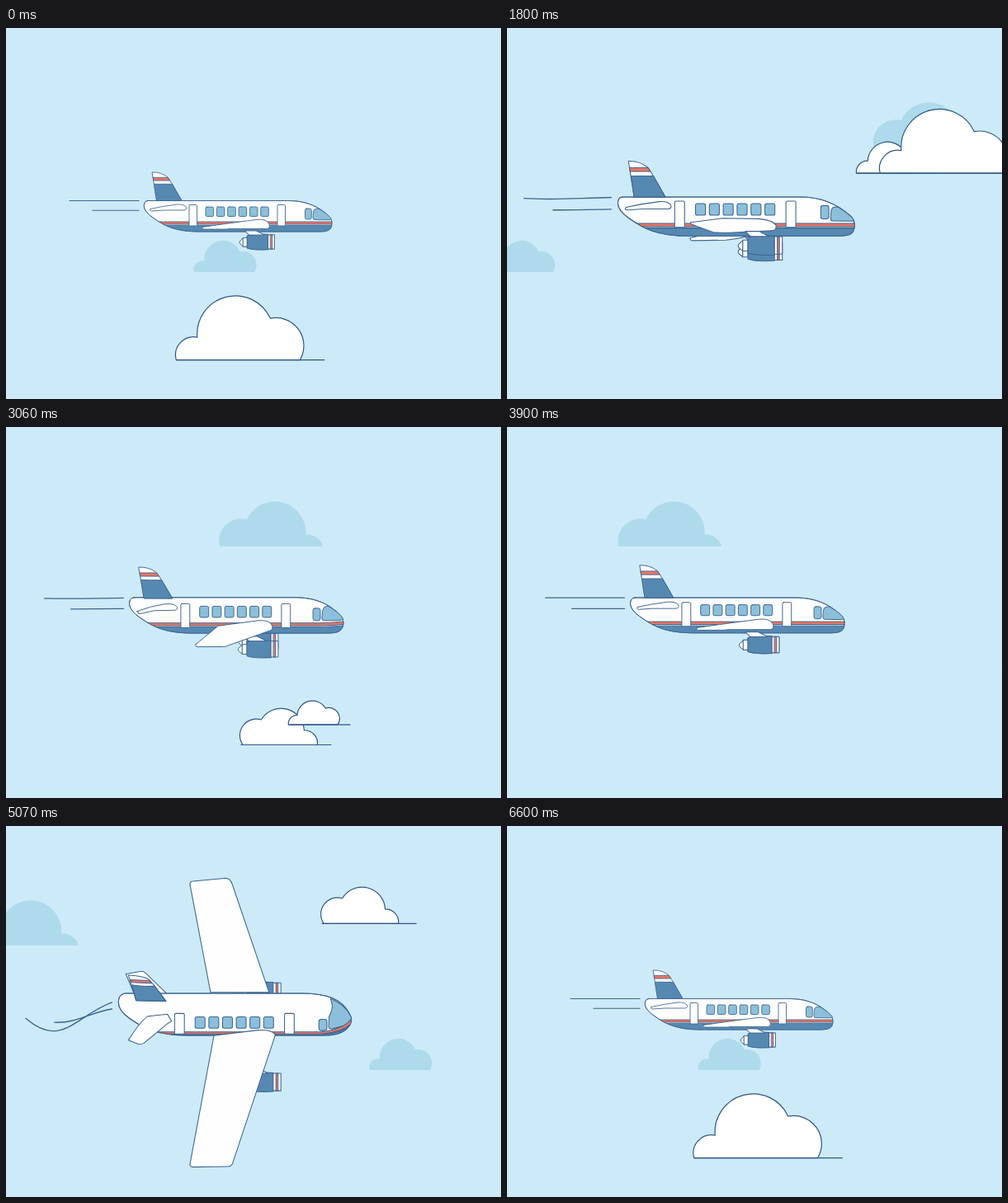
Animation, 600 px wide and 450 px high, one loop 6630 ms. Source, as an HTML page:

```html
<!DOCTYPE html>
<html lang="en">
<head>
<meta charset="utf-8">
<title>Plane in flight</title>
<style>
  html, body { margin: 0; width: 100%; height: 100%; overflow: hidden; background: #cdeaf8; }
  svg { display: block; width: 100vw; height: 100vh; }
  .pale { fill: #aedbeb; }
  .white { fill: #fff; stroke: #2d5788; stroke-width: 1.2; stroke-linejoin: round; }
  .white path { vector-effect: non-scaling-stroke; }
  #plane { stroke: #3d6591; stroke-width: .85; stroke-linejoin: round; stroke-linecap: round; }
</style>
</head>
<body>
<svg viewBox="0 0 600 450">
  <rect width="600" height="450" fill="#cdeaf8"/>
  <g id="clouds"></g>
  <g id="plane"></g>
</svg>
<script>
const LOOP = 6630;
const WHITE = '#fefefe', BLUE = '#5689b2', RED = '#ee7560', GLASS = '#8cbfd9';
const cloudLayer = document.getElementById('clouds');
const plane = document.getElementById('plane');

// Outlines start at the lower left, on the base line.
const SHAPES = {
  broad: 'M1 0A22 22 0 0 1 26.5 -27.5A46.4 46.4 0 0 1 115 -50.5A34 34 0 0 1 151 0Z',
  round: 'M3.6 0A20 20 0 0 1 26 -30.5A28 28 0 0 1 78 -17.5A15.5 15.5 0 0 1 94 0Z',
  low: 'M0 0A27 27 0 0 1 33 -32.5A37.5 37.5 0 0 1 104.5 -14.5A20 20 0 0 1 125 0Z'
};

// x is the left edge at time "at"; speed in px per ms; base is the length of the ground line.
const clouds = [
  { shape: 'broad', scale: .49, x: 227.5, y: 296, at: 0, speed: .1363 },
  { shape: 'low', scale: 1, x: 259, y: 144.7, at: 3060, speed: .1473 },
  { shape: 'low', scale: .496, x: 279, y: 63, at: 930, speed: .51, base: 74 },
  { shape: 'round', scale: .86, flip: 81, x: 424, y: 176.2, at: 1800, speed: .66, base: 97 },
  { shape: 'broad', scale: 1, x: 452, y: 176.2, at: 1800, speed: .68, base: 181 },
  { shape: 'round', scale: 1, x: 284, y: 385.5, at: 3060, speed: .59, base: 111 },
  { shape: 'round', scale: .66, flip: 62, x: 343, y: 361.2, at: 3060, speed: .565, base: 75 },
  { shape: 'round', scale: 1, x: 382, y: 118.3, at: 5070, speed: .387, base: 116 },
  { shape: 'broad', scale: 1, x: 206, y: 402.6, at: 0, speed: .68, base: 181 }
];

cloudLayer.innerHTML = clouds.map(c => {
  const turn = c.flip ? `translate(${c.flip} 0) scale(${-c.scale} ${c.scale})` : `scale(${c.scale})`;
  const line = c.base ? `<path d="M1 0H${c.base}"/>` : '';
  return `<g class="${c.base ? 'white' : 'pale'}"><path d="${SHAPES[c.shape]}" transform="${turn}"/>${line}</g>`;
}).join('');

// Keys are [time, value] pairs joined by a sine ease.
const SIZE = [[0, 1], [780, 1], [1800, 1.26], [3060, 1.14], [4150, 1.14], [4800, 1.26], [4880, 1.26], [6100, 1], [LOOP, 1]];
const ROLL = [[0, 0], [370, 0], [1520, .53], [1800, -.1], [3000, .137], [3700, 0], [4120, 0], [4780, 1.43], [5575, 0], [LOOP, 0]];
const WAVE = [[0, 0], [500, 0], [1000, .02], [1800, .06], [2600, .02], [3100, .03], [3800, 0], [4300, 0], [5050, 1], [5850, 0], [LOOP, 0]];

function track(keys, t) {
  const i = keys.findIndex(key => key[0] > t);
  const [t0, a] = keys[i - 1], [t1, b] = keys[i];
  return a + (b - a) * (1 - Math.cos(Math.PI * (t - t0) / (t1 - t0))) / 2;
}

function mix([a, b], k) {
  const target = b.match(/-?[\d.]+/g);
  let i = 0;
  return a.replace(/-?[\d.]+/g, n => (+n + (target[i++] - n) * k).toFixed(2));
}

const path = (d, fill, extra = '') => `<path d="${d}" fill="${fill}" ${extra}/>`;
const box = (x, y, w, h, fill, r = 0) =>
  `<rect x="${x}" y="${y}" width="${w}" height="${Math.max(h, 0)}" rx="${r}" fill="${fill}"/>`;

// Each part: level pose, banked pose and, for wings, the pose with the underside in view.
const BODY = [
  'M172 209.5L343 209.5C366 209.5 380 218 390 227C396 232 395.5 238 394 242C392 246 388 247 378 247L235 247C205 247 192 240 178 230C168 223 166 217 168 212Q169 209.5 172 209.5Z',
  'M175 207.7L345 207.7C372 207.7 385 214 392 227C396 234 394 238 390 242C385 247 378 248.7 365 248.7L235 248.7C205 248.7 192 242 178 232C168 225 166 218 168 212Q170 207.7 175 207.7Z'];
const STRIPE = [
  'M160 235L370 235Q385 235 400 235L400 238Q385 238 370 238L160 238Z',
  'M160 245.2L365 245.2Q385 243.5 396 231L399 233Q387 246 365 247.2L160 247.2Z'];
const BELLY = [
  'M160 239.4L370 239.4Q385 239.4 400 239.4L400 255L160 255Z',
  'M160 247.9L365 247.9Q387 246.6 399 234.5L400 255L160 255Z'];
const NEAR_WING = [
  'M238 241.5L262 238L303 232.5Q317 231 319 238Q320.5 243 316 243.4L270 243.5Q269 244 266 244L240 244Q237 244 238 241.5Z',
  'M237 373L260.3 248.7L303 243.5Q316 242.5 319.7 247.5Q320 249 318.5 253L278.5 372Q277.5 375.5 274 375.5L240 376Q236.5 376 237 373Z',
  'M237.5 234L268 230L300 230.5Q316 231 319.5 237Q320 242 315 242L275 243.8Q266 244 259 243.4L240 236.5Q236 235 237.5 234Z'];
const FAR_WING = [
  'M237.5 239L257 238L314 236L277 238Q275 238 271 238L240 238Q237 238 237.5 239Z',
  'M237 103L257 207L314 207L278 102Q276 96.5 271.5 96.5L240 99.5Q236.5 99.5 237 103Z',
  'M237 249L257 244L314 238L291 247.5Q284 249.5 271 251L240 251.5Q236.5 251.5 237 249Z'];
const NEAR_STAB = [
  'M175 219.5Q190 216 207 214Q217 213.5 218.5 218Q219 221 215 221L191 221L177 222Q173 222 175 219.5Z',
  'M177 253L190 233Q196 230 209 228.5Q215 228 218.5 233Q219 235 215 237L192 256Q190 257 187 257L177 257Q174 257 177 253Z'];
const FAR_STAB = [
  'M174 220L186 218Q189 218 191 218L215 216L183 216Z',
  'M174.5 189L187 186.8Q191 186 193 187.5L215.5 209L183 209Z'];
const FIN = [
  'M177.5 175Q188 174.5 196 181Q199 185 201.5 189.5L213 209.5L183 209.5Z',
  'M177 190Q190 190.5 196 193.5Q200 197 202.5 200.5L213.5 215.2L184.5 214.6Z'];
const FIN_BLUE = [
  'M180 189.3Q191 189.3 201.5 189.3L213 209.5L183 209.5Z',
  'M180.5 199.4Q191 201.5 202.5 200.5L213.5 215.2L184.5 214.6Z'];
const FIN_RED = ['M178.5 181.3L196.3 181.3L198.8 185L179.3 185Z', 'M178.6 194.4L197.4 195.2L199.6 197.8L179.8 197Z'];
const SHIELD = [
  'M379 219L374.5 219.5Q373 220.5 372.5 223L372 230Q372 232.5 374 232.5L390 232.8Q395 233 394.3 231.5Q392 227 379 219Z',
  'M374 213L375.5 219Q375.5 225 372.5 230L372 240Q372 242.3 375 242.3L386 239.5Q392 236 394.3 232Q390 220 374 213Z'];
const TRAILS = [
  ['M77 209.5C108 209.5 125 209.5 161 209.5', 'M77 232C112 262 125 230 161 216.5'],
  ['M105 221.2C125 221.2 140 221.2 161 221.2', 'M105 236C128 237 140 226 161 223']];

function engine(dy) {
  return `<g transform="translate(0 ${dy})">` +
    path('M287.5 255L284.5 257.5Q281.5 260 284.5 262.5L287.5 265Z', WHITE) +
    box(287.5, 254.5, 5, 10.5, WHITE) +
    path('M292.5 252Q300 249.5 318 250.5V268.7Q300 269.7 292.5 267Z', BLUE) +
    box(318, 251, 7.5, 17, WHITE) + box(320.7, 251, 2, 17, RED) +
    path('M290 246H303L313 251H295Z', WHITE) + '</g>';
}

function drawPlane(k, wave) {
  const bank = Math.max(k, 0);
  // Height on the rolled hull of a line at the given angle.
  const hull = angle => 228.5 - 19 * Math.sin(angle - .76 * k);
  const panel = (x, w, top, bottom, fill, r) => box(x, hull(top), w, hull(bottom) - hull(top), fill, r);
  const morph = (pair, fill) => path(mix(pair, bank), fill);
  const wing = ([level, banked, under]) =>
    path(k < 0 ? mix([level, under], -10 * k) : mix([level, banked], k), WHITE);
  const body = mix(BODY, bank);

  let windows = '';
  for (let i = 0; i < 6; i++) windows += panel(242 + 13.35 * i, 9.6, .65, 0, GLASS, 1.6);

  const nearEngine = engine(34.4 * k);
  const nearWing = wing(NEAR_WING);
  return TRAILS.map(pair => path(mix(pair, wave), 'none', 'stroke-width="1.1"')).join('') +
    engine(-25 * k - 28 * k * k) +
    wing(FAR_WING) +
    morph(FAR_STAB, WHITE) +
    `<clipPath id="hull"><path d="${body}"/></clipPath>` +
    path(body, WHITE) +
    `<g clip-path="url(#hull)">${morph(STRIPE, RED)}${morph(BELLY, BLUE)}</g>` +
    path(body, 'none') +
    morph(FIN, WHITE) + morph(FIN_RED, RED) + morph(FIN_BLUE, BLUE) +
    windows +
    panel(222, 9.5, .828, -.65, WHITE, 1.2) +
    panel(329, 9.5, .828, -.65, WHITE, 1.2) +
    panel(362.5, 7.8, .524, -.185, GLASS, 2.2) +
    morph(SHIELD, GLASS) +
    morph(NEAR_STAB, WHITE) +
    (k > 0 ? nearEngine + nearWing : nearWing + nearEngine);
}

function render(t) {
  clouds.forEach((c, i) => {
    const dt = (t - c.at + 1.5 * LOOP) % LOOP - LOOP / 2;
    cloudLayer.children[i].setAttribute('transform', `translate(${c.x - c.speed * dt} ${c.y})`);
  });
  const size = track(SIZE, t);
  plane.setAttribute('transform', `translate(294 227) scale(${size}) translate(-294 -227)`);
  plane.innerHTML = drawPlane(track(ROLL, t), track(WAVE, t));
}

const start = performance.now();
function frame() {
  render((performance.now() - start) % LOOP);
  requestAnimationFrame(frame);
}
frame();
</script>
</body>
</html>
```
